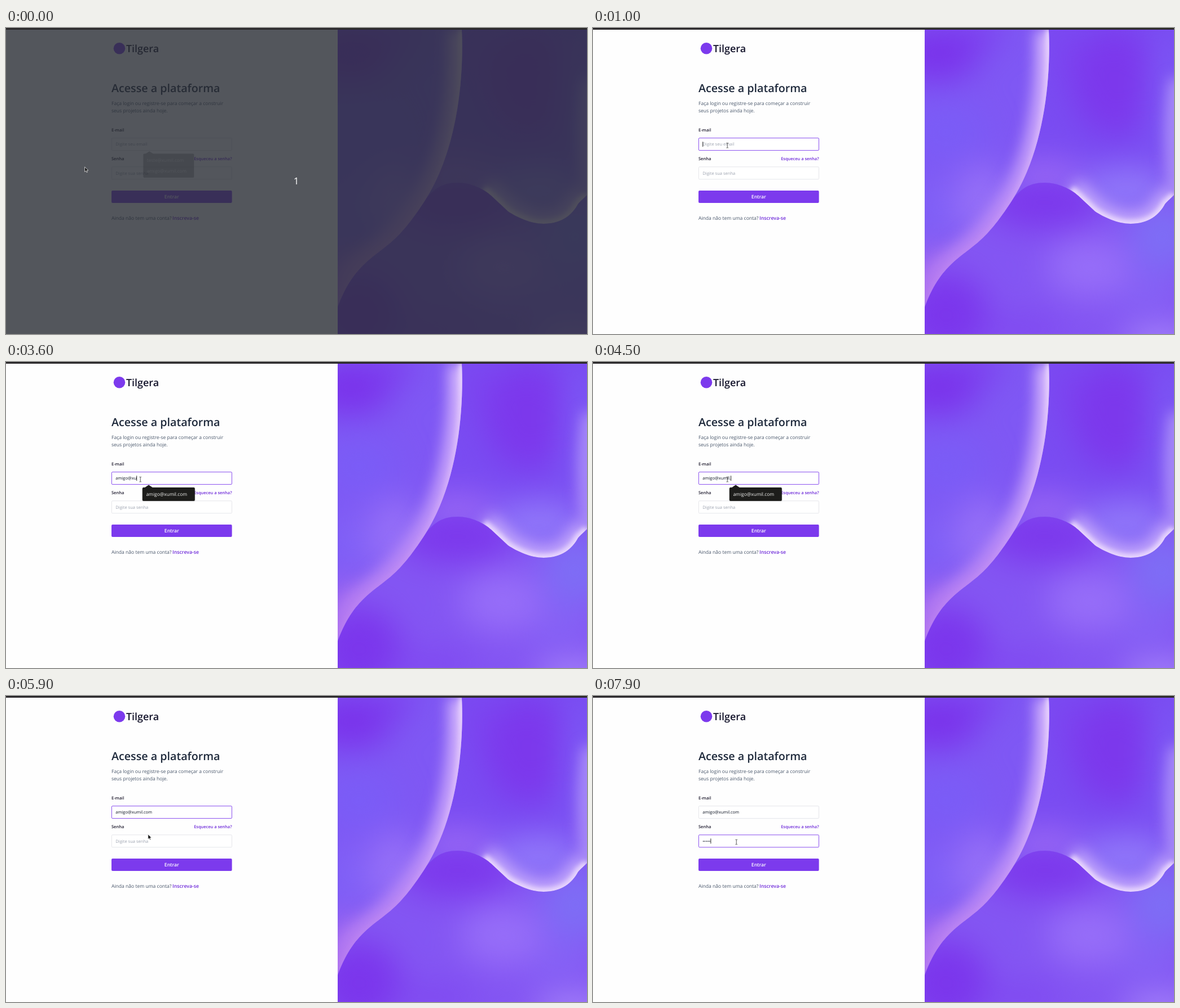
Animation, 1030 px wide and 544 px high, one loop 8 s. Source, as an HTML page:

```html
<!DOCTYPE html>
<html lang="pt">
<head>
<meta charset="utf-8">
<title>Acesse a plataforma</title>
<style>
  html, body { margin: 0; width: 100%; height: 100%; overflow: hidden; background: #fefefe; }
  svg { display: block; width: 1030px; height: 544px; }
  text { font-family: "Open Sans", "Noto Sans", sans-serif; text-rendering: geometricPrecision; }
  .semi { font-weight: 600; }
  .body { font-size: 8.56px; fill: #475569; }
  .label { font-size: 7.5px; font-weight: 600; fill: #1e1b2e; }
  .link { font-weight: 600; fill: #6d28d9; }
  .hint { font-size: 7.55px; fill: #9ca3af; }
  .typed { font-size: 7.5px; fill: #111827; }
  .item { font-size: 8.43px; fill: #f2f2f0; }
  .box { fill: #fff; stroke-width: .9; }
</style>
</head>
<body>
<svg viewBox="0 0 1030 544">
  <defs>
    <path id="edge" d="M808,3 C812,90 800,215 745,303 C690,390 670,385 630,425 C612,444 600,464 588,496"/>
    <path id="rim" d="M848,287 C852,290 856,294 860,298 L890,326 C905,336 930,348 953,348 C985,348 1004,332 1014,313 C1018,308 1024,303 1030,297"/>
    <clipPath id="panel"><rect x="588" y="3" width="442" height="541"/></clipPath>
    <clipPath id="left"><path d="M588,3 H808 C812,90 800,215 745,303 C690,390 670,385 630,425 C612,444 600,464 588,496 Z"/></clipPath>
    <clipPath id="low"><path d="M588,544 V496 C600,464 612,444 630,425 C670,385 690,390 745,303 C762,282 778,275 801,275 C825,275 848,287 860,298 L890,326 C905,336 930,348 953,348 C985,348 1004,332 1014,313 C1018,308 1024,303 1030,297 V544 Z"/></clipPath>
    <filter id="b30" filterUnits="userSpaceOnUse" x="400" y="-200" width="850" height="950" color-interpolation-filters="sRGB"><feGaussianBlur stdDeviation="28"/></filter>
    <filter id="b12" filterUnits="userSpaceOnUse" x="400" y="-200" width="850" height="950" color-interpolation-filters="sRGB"><feGaussianBlur stdDeviation="13"/></filter>
    <filter id="b4" filterUnits="userSpaceOnUse" x="400" y="-200" width="850" height="950" color-interpolation-filters="sRGB"><feGaussianBlur stdDeviation="4"/></filter>
    <linearGradient id="glow" gradientUnits="userSpaceOnUse" x1="0" y1="3" x2="0" y2="490">
      <stop offset="0" stop-color="#d9bdfc"/>
      <stop offset=".5" stop-color="#c39cf9"/>
      <stop offset="1" stop-color="#b274ef"/>
    </linearGradient>
    <linearGradient id="shine" gradientUnits="userSpaceOnUse" x1="0" y1="3" x2="0" y2="400">
      <stop offset="0" stop-color="#f0dffd"/>
      <stop offset=".55" stop-color="#dcb8fa" stop-opacity=".75"/>
      <stop offset="1" stop-color="#c890f4" stop-opacity=".3"/>
    </linearGradient>
  </defs>

  <rect width="1030" height="544" fill="#fefefe"/>

  <circle cx="201" cy="36.3" r="10.3" fill="#7c3aed"/>
  <text class="semi" x="213" y="42.8" font-size="17.9" fill="#14142b">Tilgera</text>
  <text class="semi" x="187" y="113.7" font-size="19.7" fill="#1e293b">Acesse a plataforma</text>
  <text class="body" x="187" y="136.7">Faça login ou registre-se para começar a construir</text>
  <text class="body" x="187" y="150">seus projetos ainda hoje.</text>

  <text class="label" x="187" y="184">E-mail</text>
  <rect id="mailBox" class="box" x="187.4" y="195.6" width="213" height="22" rx="1.5"/>
  <text id="mailHint" class="hint" x="194.3" y="209.4">Digite seu email</text>
  <text id="mail" class="typed" x="194.3" y="209.4"></text>

  <text class="label" x="187" y="235">Senha</text>
  <text class="link" x="400.5" y="235" font-size="7.45" text-anchor="end">Esqueceu a senha?</text>
  <rect id="passBox" class="box" x="187.4" y="246.9" width="213" height="22" rx="1.5"/>
  <text id="passHint" class="hint" x="194.3" y="260.6">Digite sua senha</text>
  <text id="pass" class="typed" x="194.3" y="260.6"></text>
  <rect id="caret" width=".9" height="9" fill="#111"/>

  <rect x="187" y="289" width="213.6" height="22" rx="2" fill="#7c3aed"/>
  <text class="semi" x="293.8" y="303.2" font-size="8.6" fill="#fff" text-anchor="middle">Entrar</text>
  <text class="body" x="187" y="341">Ainda não tem uma conta?</text>
  <text class="link" x="295" y="341" font-size="8.75">Inscreva-se</text>

  <g clip-path="url(#panel)">
    <rect x="588" y="3" width="442" height="541" fill="#7a4cf2"/>
    <g filter="url(#b30)">
      <ellipse cx="925" cy="95" rx="75" ry="95" fill="#7c38ec"/>
      <ellipse cx="835" cy="40" rx="25" ry="60" fill="#7c45f0"/>
      <ellipse cx="1015" cy="120" rx="30" ry="110" fill="#7c5af5"/>
      <ellipse cx="800" cy="265" rx="70" ry="32" fill="#9867f4"/>
      <ellipse cx="945" cy="290" rx="85" ry="45" fill="#9077f9"/>
    </g>
    <path d="M1036,90 Q1020,200 1036,300" fill="none" stroke="#b49af9" stroke-width="24" filter="url(#b12)"/>
    <use href="#rim" fill="none" stroke="#c3a8fb" stroke-width="44" filter="url(#b12)"/>
    <use href="#rim" fill="none" stroke="#ead8fd" stroke-width="13" filter="url(#b4)"/>

    <g clip-path="url(#low)">
      <rect x="588" y="270" width="442" height="274" fill="#8456f3"/>
      <g filter="url(#b30)">
        <ellipse cx="800" cy="310" rx="105" ry="48" fill="#7c38ec"/>
        <ellipse cx="625" cy="510" rx="75" ry="75" fill="#7b36ec"/>
        <ellipse cx="760" cy="535" rx="80" ry="24" fill="#7f48f0"/>
        <ellipse cx="880" cy="425" rx="75" ry="55" fill="#966df8"/>
        <ellipse cx="1010" cy="370" rx="60" ry="65" fill="#7e6df5"/>
        <ellipse cx="985" cy="475" rx="60" ry="35" fill="#8662f5"/>
        <ellipse cx="1010" cy="555" rx="75" ry="18" fill="#b294fb"/>
      </g>
    </g>

    <g clip-path="url(#left)">
      <rect x="588" y="3" width="222" height="493" fill="#7f58f4"/>
      <g filter="url(#b30)">
        <ellipse cx="610" cy="45" rx="75" ry="50" fill="#7a33eb"/>
        <ellipse cx="685" cy="10" rx="45" ry="22" fill="#7c3cee"/>
        <ellipse cx="625" cy="185" rx="70" ry="55" fill="#7b5cf6"/>
        <ellipse cx="690" cy="310" rx="50" ry="70" fill="#956ff7"/>
        <ellipse cx="600" cy="320" rx="40" ry="60" fill="#8060f6"/>
        <ellipse cx="605" cy="440" rx="45" ry="45" fill="#aa6eef"/>
      </g>
      <use href="#edge" fill="none" stroke="url(#glow)" stroke-width="46" filter="url(#b12)"/>
      <use href="#edge" fill="none" stroke="url(#shine)" stroke-width="9" filter="url(#b4)"/>
    </g>
  </g>

  <g id="popup">
    <rect id="shade" x="241.4" y="223.4" width="94" rx="2.5" fill="#000" opacity=".15"/>
    <path d="M245.5,223.5 L253,218.6 L260.5,223.5 Z" fill="#1d1d1b"/>
    <rect id="card" x="241.8" y="223" width="93" rx="2" fill="#1d1d1b"/>
    <text id="item1" class="item" x="248.4" y="238.3"></text>
    <text id="item2" class="item" x="248.4" y="257.6"></text>
  </g>

  <g id="dim">
    <rect width="1030" height="544" fill="#282c34" opacity=".8"/>
    <text x="514.7" y="278" font-size="17" fill="#fff" text-anchor="middle">1</text>
  </g>
  <rect width="1030" height="3" fill="#2b292b"/>

  <path id="arrow" d="M0,0 V8.6 L2,6.9 L3.4,9.8 L4.8,9.2 L3.5,6.3 L6.2,6 Z" fill="#161616" stroke="#fff" stroke-width=".7"/>
  <path id="beam" d="M-1.8,-4.3 H-.6 L0,-3.8 L.6,-4.3 H1.8 M0,-3.8 V3.8 M-1.8,4.3 H-.6 L0,3.8 L.6,4.3 H1.8" fill="none" stroke="#444" stroke-width=".9"/>
</svg>
<script>
const LOOP = 8000;
const MAIL = "amigo@xumil.com", OTHER = "teste@xumil.com";
const el = id => document.getElementById(id);

// Key times for each character.
const mailKeys = [1600, 1900, 2100, 2300, 2500, 3100, 3400, 3600, 3800, 3900, 4100, 4500, 4800, 5000, 5100];
const passKeys = [6800, 7100, 7300, 7600, 7900];

// Steps: time, then values held until the next step.
const pointer = [
  [0, 139.6, 247, "arrow"], [600, 166, 236, "arrow"], [700, 215, 212, "beam"], [800, 238.2, 208.7, "beam"],
  [5700, 240, 222, "arrow"], [5800, 247, 236, "arrow"], [5900, 251.8, 246, "arrow"],
  [6100, 253.6, 256, "beam"], [6200, 254.2, 259.6, "beam"]
];
const focus = [[0, ""], [800, "mail"], [6300, "pass"]];
const caretOn = [[0, false], [1000, true], [5700, false], [6400, true]];
const popup = [
  [0, .3, .965, 2], [100, 0, 1, 2], [1600, .5, .97, 2], [1700, 1, 1, 2], [1800, 1, 1, 1],
  [5200, .52, .97, 1], [5300, .15, .96, 1], [5400, 0, 1, 1]
];

const at = (steps, t) => steps.filter(s => s[0] <= t).pop();
const count = (keys, t) => keys.filter(k => k <= t).length;
const show = (node, on) => node.setAttribute("visibility", on ? "visible" : "hidden");

function drawField(id, text, active) {
  el(id).textContent = text;
  show(el(id + "Hint"), !text);
  el(id + "Box").setAttribute("stroke", active ? "#7c3aed" : "#e2e4e8");
}

function drawPopup(t) {
  const [, alpha, scale, rows] = at(popup, t);
  const height = rows === 2 ? 44 : 24;
  el("popup").setAttribute("opacity", alpha);
  el("popup").setAttribute("transform", `translate(288 235) scale(${scale}) translate(-288 -235)`);
  el("card").setAttribute("height", height);
  el("shade").setAttribute("height", height + .6);
  el("item1").textContent = rows === 2 ? OTHER : MAIL;
  el("item2").textContent = rows === 2 ? MAIL : "";
}

function drawCaret(t, active) {
  const on = active && at(caretOn, t)[1];
  show(el("caret"), on);
  if (!on) return;
  const node = el(active);
  const width = node.textContent ? node.getComputedTextLength() : 0;
  el("caret").setAttribute("x", 194.3 + width);
  el("caret").setAttribute("y", active === "mail" ? 202.2 : 253.4);
}

function drawPointer(t) {
  const [, x, y, kind] = at(pointer, t);
  for (const id of ["arrow", "beam"]) {
    show(el(id), id === kind);
    el(id).setAttribute("transform", `translate(${x} ${y})`);
  }
}

function draw(t) {
  const active = at(focus, t)[1];
  drawField("mail", MAIL.slice(0, count(mailKeys, t)), active === "mail");
  drawField("pass", "•".repeat(count(passKeys, t)), active === "pass");
  drawPopup(t);
  drawCaret(t, active);
  drawPointer(t);
  show(el("dim"), t < 100);
}

let start;
function tick(now) {
  start ??= now;
  draw((now - start) % LOOP);
  requestAnimationFrame(tick);
}
draw(0);
requestAnimationFrame(tick);
</script>
</body>
</html>
```
